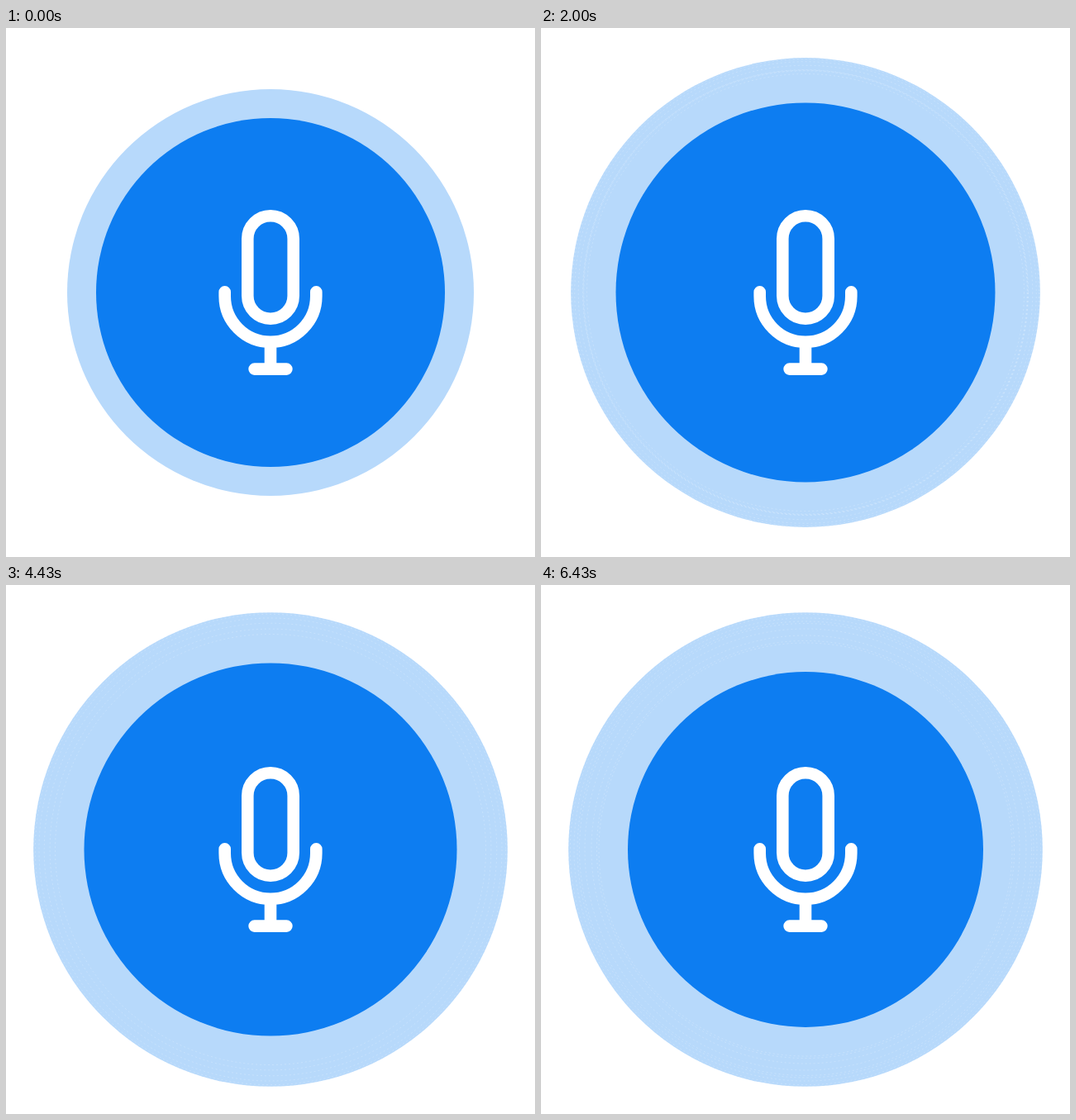
These frames come from a looping animation (640 by 640 pixels, 6.93 s). An HTML page:

```html
<!DOCTYPE html>
<html lang="en">
<head>
<meta charset="utf-8">
<title>Microphone pulse</title>
<style>
  html, body { margin: 0; width: 100%; height: 100%; overflow: hidden; background: #fff; }
  svg { display: block; width: 100vw; height: 100vh; }
  .mic { fill: none; stroke: #fff; stroke-width: 14.6; stroke-linecap: round; }
  .trace { fill: none; stroke: #fff; stroke-width: .7; stroke-dasharray: 2 3; opacity: .3; }
</style>
</head>
<body>
<svg viewBox="0 0 640 640">
  <circle id="halo" cx="320" cy="320" r="246" fill="#b7d9fb"/>
  <g id="traces"></g>
  <circle id="disc" cx="320" cy="320" r="211" fill="#0d7df1"/>
  <g class="mic">
    <rect x="292.3" y="227.3" width="55.4" height="124.4" rx="27.7"/>
    <path d="M264.7 319.3v5.2a55.3 55.3 0 0 0 110.6 0v-5.2M320 380v32.6M300.6 412.6h38.8"/>
  </g>
</svg>
<script>
  const LOOP = 6930, FPS = 14, LAST = 90, RING = 35;

  // [time in ms, halo radius] at each turning point of the pulse
  const turns = [
    [71, 246], [620, 284], [1300, 250], [1880, 269], [2250, 250],
    [2650, 278], [3330, 247], [4050, 287], [4600, 253], [4880, 274],
    [5480, 249], [6070, 276], [6430, 250]
  ];

  function radiusAt(ms) {
    if (ms <= turns[0][0]) return turns[0][1];
    const i = turns.findIndex(([t]) => t >= ms);
    if (i < 0) return turns[turns.length - 1][1];
    const [t0, r0] = turns[i - 1], [t1, r1] = turns[i];
    const ease = (1 - Math.cos(Math.PI * (ms - t0) / (t1 - t0))) / 2;
    return r0 + (r1 - r0) * ease;
  }

  const radii = Array.from({ length: LAST + 1 }, (_, k) => radiusAt(k * 1000 / FPS));
  const halo = document.getElementById('halo');
  const disc = document.getElementById('disc');
  const traces = document.getElementById('traces');

  // The halo never shrinks within a loop; uncovered older edges stay faintly visible.
  function draw(step) {
    let widest = 0, rings = '';
    for (let k = step; k >= 0; k--) {
      if (radii[k] <= widest) continue;
      widest = radii[k];
      rings += `<circle class="trace" cx="320" cy="320" r="${widest.toFixed(2)}"/>`;
    }
    halo.setAttribute('r', widest);
    disc.setAttribute('r', radii[step] - RING);
    traces.innerHTML = step > 1 ? rings : '';
  }

  let shown = -1;
  const start = performance.now();
  function tick() {
    const ms = (performance.now() - start) % LOOP;
    const step = Math.min(LAST, Math.floor((ms + 5) * FPS / 1000));
    if (step !== shown) draw(shown = step);
    requestAnimationFrame(tick);
  }
  tick();
</script>
</body>
</html>
```
